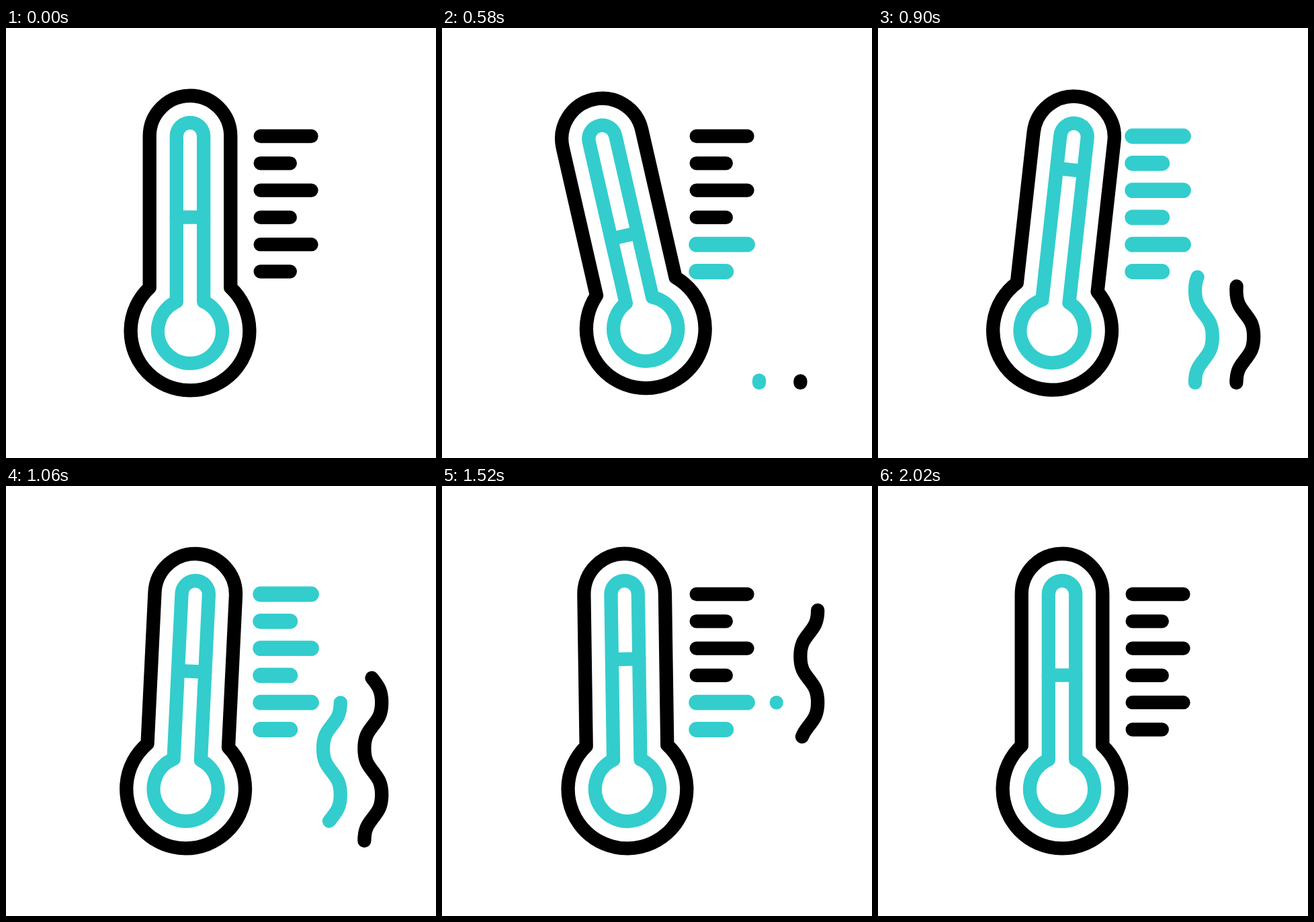
Write an HTML page that moves like this. It is 640 px wide and 640 px high and loops after 2420 ms.

```html
<!DOCTYPE html>
<html>
<head>
<meta charset="utf-8">
<style>
  html, body { margin: 0; height: 100%; overflow: hidden; background: #fff; }
  svg { display: block; width: 100vw; height: 100vh; }
  path { fill: none; stroke: #000; stroke-width: 20.3; stroke-linecap: round; stroke-linejoin: round; }
  .teal { stroke: #33cdcd; }
  .lit { stroke: #33cdcd; stroke-width: 22.8; }
</style>
</head>
<body>
<svg viewBox="0 0 640 640">
  <g id="bars"></g>
  <g id="meter">
    <path d="M213.7 386.4V161A60.3 60.3 0 0 1 334.3 161V386.4A88.4 88.4 0 1 1 213.7 386.4Z"/>
    <path class="teal" d="M253.8 407.3V161A20.2 20.2 0 0 1 294.2 161V407.3A48.1 48.1 0 1 1 253.8 407.3Z"/>
    <path class="teal" id="level" d="M253.8 0H294.2"/>
  </g>
  <path class="teal" id="tealWave" pathLength="1"/>
  <path id="blackWave" pathLength="1"/>
</svg>
<script>
const LOOP = 2420;
const $ = id => document.getElementById(id);

// Keyframes are [time, value] pairs, eased between neighbours.
const TILT = [[0, 0], [583, -12.9], [920, 6.5], [1250, -3], [1667, 0]];
const LEVEL = [[0, 281.7], [470, 331], [880, 209], [1230, 336], [1530, 257.5], [2000, 281.7]];
const WAVES = [
  { el: $('tealWave'), x: 472, humps: 3, grow: [542, 1070], fade: [917, 1533] },
  { el: $('blackWave'), x: 533.4, humps: 5, grow: [542, 1350], fade: [1127, 1974] }
];

function ease(t, from, to) {
  const u = Math.min(1, Math.max(0, (t - from) / (to - from)));
  return u * u * (3 - 2 * u);
}

function valueAt(keys, t) {
  const i = keys.findIndex(k => k[0] > t);
  if (i < 0) return keys[keys.length - 1][1];
  const [t0, a] = keys[i - 1], [t1, b] = keys[i];
  return a + (b - a) * ease(t, t0, t1);
}

// Wave rising from the bottom in equal half waves, vertical at each extreme.
function wavePath(x, humps) {
  let d = `M${x} 528`;
  for (let i = 0; i < humps; i++) {
    const s = i % 2 ? -1 : 1;
    d += `c0 -19.5 ${6.7 * s} -26 ${12.9 * s} -34.3s${12.9 * s} -14.8 ${12.9 * s} -34.3`;
  }
  return d;
}

function addBar(i, cls) {
  const bar = document.createElementNS('http://www.w3.org/2000/svg', 'path');
  bar.setAttribute('d', `M378.7 ${161 + 40.3 * i}H${i % 2 ? 422.8 : 454.5}`);
  bar.setAttribute('class', cls);
  $('bars').append(bar);
  return bar;
}

const lit = [];
for (let i = 0; i < 6; i++) {
  addBar(i, '');
  lit.push(addBar(i, 'lit'));
}
for (const w of WAVES) w.el.setAttribute('d', wavePath(w.x, w.humps));

function draw(now) {
  const t = now % LOOP;
  $('meter').setAttribute('transform', `rotate(${valueAt(TILT, t)} 274 320)`);
  $('level').setAttribute('transform', `translate(0 ${valueAt(LEVEL, t)})`);

  // Bars light from the bottom up and go out from the top down.
  lit.forEach((bar, i) => {
    const on = t >= 417 + (5 - i) * 83.3 && t < 1250 + i * 83.3;
    bar.style.visibility = on ? 'visible' : 'hidden';
  });

  for (const w of WAVES) {
    const start = ease(t, ...w.fade), end = ease(t, ...w.grow);
    w.el.style.visibility = end > start ? 'visible' : 'hidden';
    w.el.style.strokeDasharray = `${Math.max(0, end - start)} 9`;
    w.el.style.strokeDashoffset = -start;
  }
  requestAnimationFrame(() => draw(performance.now()));
}
draw(performance.now());
</script>
</body>
</html>
```
